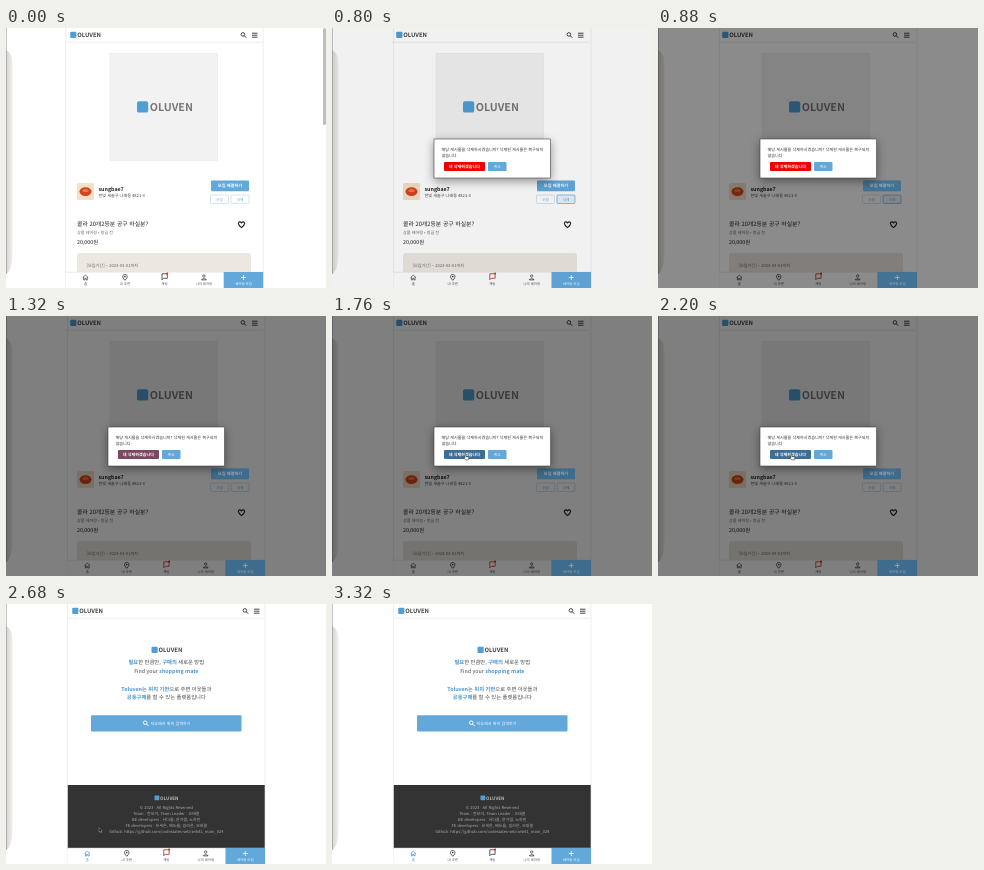
An HTML page that plays this animation: 320 by 260 pixels, repeating every 3360 ms.

```html
<!DOCTYPE html>
<html lang="ko">
<head>
<meta charset="utf-8">
<style>
html, body { margin: 0; width: 100%; height: 100%; overflow: hidden; background: #fff; }
svg { display: block; width: 320px; height: 260px; }
text { font-family: "Noto Sans CJK KR", "Noto Sans CJK", "Noto Sans", sans-serif; text-rendering: geometricPrecision; white-space: pre; }
.b { font-weight: 700; }
.m { font-weight: 500; }
tspan { fill: #4294d0; font-weight: 700; }
#dialog { filter: drop-shadow(0 3px 5px rgba(0,0,0,.4)); }
</style>
</head>
<body>
<svg id="stage" viewBox="0 0 320 260"></svg>
<script>
const BLUE = '#62a8da', INK = '#333';
const LOOP = 3360, OPEN = 780, LEAVE = 2240;

const rect = (x, y, w, h, fill, more = '') =>
  `<rect x="${x}" y="${y}" width="${w}" height="${h}" fill="${fill}" ${more}/>`;
const text = (x, y, size, fill, s, more = '') =>
  `<text x="${x}" y="${y}" font-size="${size}" fill="${fill}" ${more}>${s}</text>`;
const mid = (x, y, size, fill, s, more = '') =>
  text(x, y, size, fill, s, 'text-anchor="middle" ' + more);
const line = (d, stroke, width = .8, more = '') =>
  `<path d="${d}" fill="none" stroke="${stroke}" stroke-width="${width}" ${more}/>`;
const group = (id, body, more = '') => `<g id="${id}" ${more}>${body}</g>`;

const brand = (x, base, size, fill, mark = '#4f9fd6') =>
  rect(x, base - size * .92, size * 1.05, size * 1.05, mark, `rx="${size * .18}"`) +
  text(x + size * 1.2, base, size, fill, 'OLUVEN', 'class="b"');

const lens = (x, y, color) =>
  `<circle cx="${x - .6}" cy="${y - .6}" r="1.8" fill="none" stroke="${color}" stroke-width=".9"/>` +
  line(`M${x + .7} ${y + .7}l2 2`, color, 1);

const header = x =>
  rect(x, 0, 197.5, 14, '#fff') + line(`M${x} 14.2h197.5`, '#ddd', .6) +
  brand(x + 4.7, 9.2, 5.9, '#444') + lens(x + 178, 7, INK) +
  line(`M${x + 186.5} 5.2h5.5m-5.5 2h5.5m-5.5 2h5.5`, INK, .9);

const solveButton = rect(205, 152.5, 38, 10.7, BLUE, 'rx="1"') +
  mid(224, 159.4, 4.2, '#fff', '모집 해결하기', 'class="b"');

const smallButton = (x, label, id) =>
  rect(x, 167, 18, 8.5, '#fff', `id="${id}" rx="1" stroke="#b4d5ec" stroke-width=".6"`) +
  mid(x + 9, 172.6, 3.6, '#5b9fcf', label);

// Post detail
const post = header(59.5) +
  rect(104, 25.3, 107.5, 107.2, '#f2f2f2', 'stroke="#e6e6e6" stroke-width=".5"') +
  brand(131, 83.2, 10.7, '#777') +
  rect(71, 155, 17, 17, '#f5e0c8', 'rx="1.5"') +
  '<ellipse cx="79.5" cy="163.6" rx="6" ry="4.3" fill="#d6441f"/>' +
  '<ellipse cx="79.5" cy="162.6" rx="3.2" ry="1.6" fill="#ee7a42"/>' +
  text(92.5, 162.6, 5.3, '#222', 'sungbae7', 'class="b"') +
  text(92.5, 168.8, 4.1, '#444', '한빛 새솔구 나래동 4821-3') +
  solveButton + smallButton(204.5, '수정', 'edit') + smallButton(225, '삭제', 'del') +
  text(71, 197.8, 5.85, '#222', '콜라 20개2등분 공구 하실분?', 'class="m"') +
  text(71, 206.4, 4.1, '#666', '상품 쉐어링 • 방금 전') +
  text(71, 215.8, 5.3, '#222', '20,000원', 'class="m"') +
  line('M235.5 199.6C231 196 232.2 193.9 233.7 193.9Q234.8 193.9 235.5 194.9Q236.2 193.9 237.3 193.9C238.8 193.9 240 196 235.5 199.6Z', '#222', 1.1) +
  rect(71, 225, 174, 40, '#ece7e1', 'rx="3"') +
  text(80.5, 239.2, 4.15, '#666', '[모집기간] ~ 2023-03-01까지');

// Landing page
const note = (y, s) => mid(160.3, y, 4.05, '#aaa', s);
const home = header(61.5) + brand(145.5, 48.2, 5.9, '#444') +
  mid(160.3, 60.4, 5.3, '#444', '<tspan>필요</tspan>한 만큼만, <tspan>구매의</tspan> 새로운 방법') +
  mid(160.3, 68.6, 5.3, '#444', 'Find your <tspan>shopping mate</tspan>') +
  mid(160.3, 86.5, 5.3, '#444', '<tspan>Toluven</tspan>는 <tspan>위치 기반</tspan>으로 주변 이웃들과') +
  mid(160.3, 94.8, 5.3, '#444', '<tspan>공동구매</tspan>를 할 수 있는 플랫폼입니다') +
  rect(85, 111.3, 150.5, 16.2, BLUE, 'rx="1"') + lens(139.8, 119.3, '#fff') +
  text(144.5, 121, 4.1, '#fff', '지도에서 위치 검색하기') +
  rect(61.5, 181, 197.5, 64, '#333') + brand(148.5, 195.7, 4.6, '#bbb') +
  note(204.5, '© 2023 · All Rights Reserved') +
  note(210.7, 'Team : 한모아, Team Leader : 오태결') +
  note(216.8, 'BE developers : 서다올, 문가람, 노하빈') +
  note(223, 'FE developers : 유세온, 배도율, 임라온, 오태결') +
  note(229.1, 'Github: https://github.com/codestates-seb/seb41_main_024');

const tab = rect(158, 244, 39.5, 16, BLUE) + line('M177.8 247v5m-2.5-2.5h5', '#fff', .8) +
  mid(177.8, 256.8, 3.4, '#fff', '쉐어링 모집', 'class="m"');
const label = (i, s) => mid(19.75 + 39.5 * i, 256.8, 3.4, '#555', s);

const nav = rect(0, 244, 197.5, 16, '#fff') + line('M0 244.2h197.5', '#ddd', .6) +
  group('homeTab', line('M17 249.6l2.75-2.5 2.75 2.5m-4.6-.7v3.1h1.2v-1.7h1.3v1.7h1.2v-3.1', 'currentColor', .7) +
    mid(19.75, 256.8, 3.4, 'currentColor', '홈')) +
  line('M59.25 252.3C55.4 248.5 57.3 246.5 59.25 246.5S63.1 248.5 59.25 252.3Z', INK, .8) +
  `<circle cx="59.25" cy="248.6" r=".8" fill="${INK}"/>` +
  line('M96.3 251.8v-6h5.3v4.5h-3.9z', 'currentColor', .8, 'id="chat"') +
  '<circle cx="101.6" cy="245.6" r="1" fill="#e0241c"/>' +
  `<circle cx="138.2" cy="248" r="1.2" fill="none" stroke="${INK}" stroke-width=".7"/>` +
  line('M135.9 251.9v-.5q2.3-1.6 4.6 0v.5z', INK, .7) +
  label(1, '내 주변') + label(2, '채팅') + label(3, '나의 쉐어링') + tab;

const dialog = rect(102, 111, 116.5, 39, '#fff', 'stroke="#444" stroke-width=".6"') +
  text(109.5, 122.5, 4.1, '#333', '해당 게시물을 삭제하시겠습니까? 삭제된 게시물은 복구되지') +
  text(109.5, 128.8, 4.1, '#333', '않습니다') +
  rect(112, 134, 41, 9, '#f00000', 'id="yes" rx="1"') +
  mid(132.5, 140, 4.1, '#fff', '네 삭제하겠습니다', 'class="b"') +
  rect(156, 134, 18.5, 9, BLUE, 'rx="1"') + mid(165.2, 139.9, 3.8, '#fff', '취소');

const $ = id => document.getElementById(id);
$('stage').innerHTML =
  '<defs><linearGradient id="edge"><stop stop-color="#d8d4d1"/><stop offset="1" stop-color="#f3efed"/></linearGradient></defs>' +
  rect(0, 0, 320, 260, '#fff') +
  '<path d="M0 22Q6.5 25 6.5 36V222Q6.5 243 0 246Z" fill="url(#edge)"/>' + line('M.3 0V246', '#888', .6) +
  group('post', post) + group('home', home) +
  group('frame', line('M0 0V260M197.5 0V260', '#e2e2e2', .6) + nav) +
  rect(317, 0, 3, 97, '#bdbdbd', 'id="bar" rx="1.5"') +
  group('shade', rect(0, 0, 320, 260, '#000', 'opacity=".5"') +
    group('glow', solveButton + group('', tab, 'transform="translate(61.5)"'), 'opacity=".3"')) +
  group('dialog', dialog) +
  group('status', rect(0, 253.7, 106, 7, '#222') +
    text(1.5, 258.5, 3.5, '#fff', 'toluven.xyz의 응답을 기다리는 중...', 'class="b"')) +
  group('cursor',
    '<path id="arrow" d="M0 0V4.3L1 3.4 1.8 5 2.5 4.7 1.8 3.1H3.1Z" fill="#111" stroke="#fff" stroke-width=".3"/>' +
    '<path id="hand" d="M0 0Q.6-.5 1 .1V2L3.4 2.4Q4 2.6 3.8 3.6L3.2 5.4H.6L-1.2 3.2Q-1.2 2.4-.4 2.8L0 3.1Z" fill="#fff" stroke="#111" stroke-width=".5"/>');

const ramp = (t, a, b) => Math.min(1, Math.max(0, (t - a) / (b - a)));
const ease = p => p * p * (3 - 2 * p);
const mix = (a, b, p) => `rgb(${a.map((v, i) => Math.round(v + (b[i] - v) * p))})`;
const show = (id, on) => $(id).style.display = on ? '' : 'none';

function draw(t) {
  const landed = t >= LEAVE, modal = t >= OPEN && !landed;
  show('post', !landed);
  show('home', landed);
  show('dialog', modal);
  show('bar', t < OPEN);
  show('status', landed && t < 2640);
  $('frame').setAttribute('transform', `translate(${t < OPEN ? 59.7 : 61.5})`);
  $('shade').setAttribute('opacity', modal ? ramp(t, 790, 890) : 0);

  const over = ease(ramp(t, 380, 560)) - ease(ramp(t, 800, 1100));
  $('del').setAttribute('fill', mix([255, 255, 255], [232, 243, 251], over));
  $('del').setAttribute('stroke', mix([180, 213, 236], [80, 152, 205], over));
  $('yes').setAttribute('fill', mix([240, 0, 0], [61, 111, 150], ease(ramp(t, 1160, 1430))));
  $('homeTab').style.color = t >= 2400 ? '#4294d0' : '#444';
  $('chat').style.color = mix([51, 51, 51], [224, 36, 28], Math.sin(Math.PI * t / LOOP));

  const come = ease(ramp(t, 1360, 1640)), go = ease(ramp(t, 2480, 2800));
  show('cursor', t >= 1360 && t < 2800);
  show('hand', !landed);
  show('arrow', landed);
  $('cursor').setAttribute('transform',
    `translate(${145 - 12 * come - 58 * go} ${141 - 2.5 * come + 124 * go})`);
}

function tick() {
  draw(performance.now() % LOOP);
  requestAnimationFrame(tick);
}
tick();
</script>
</body>
</html>
```
